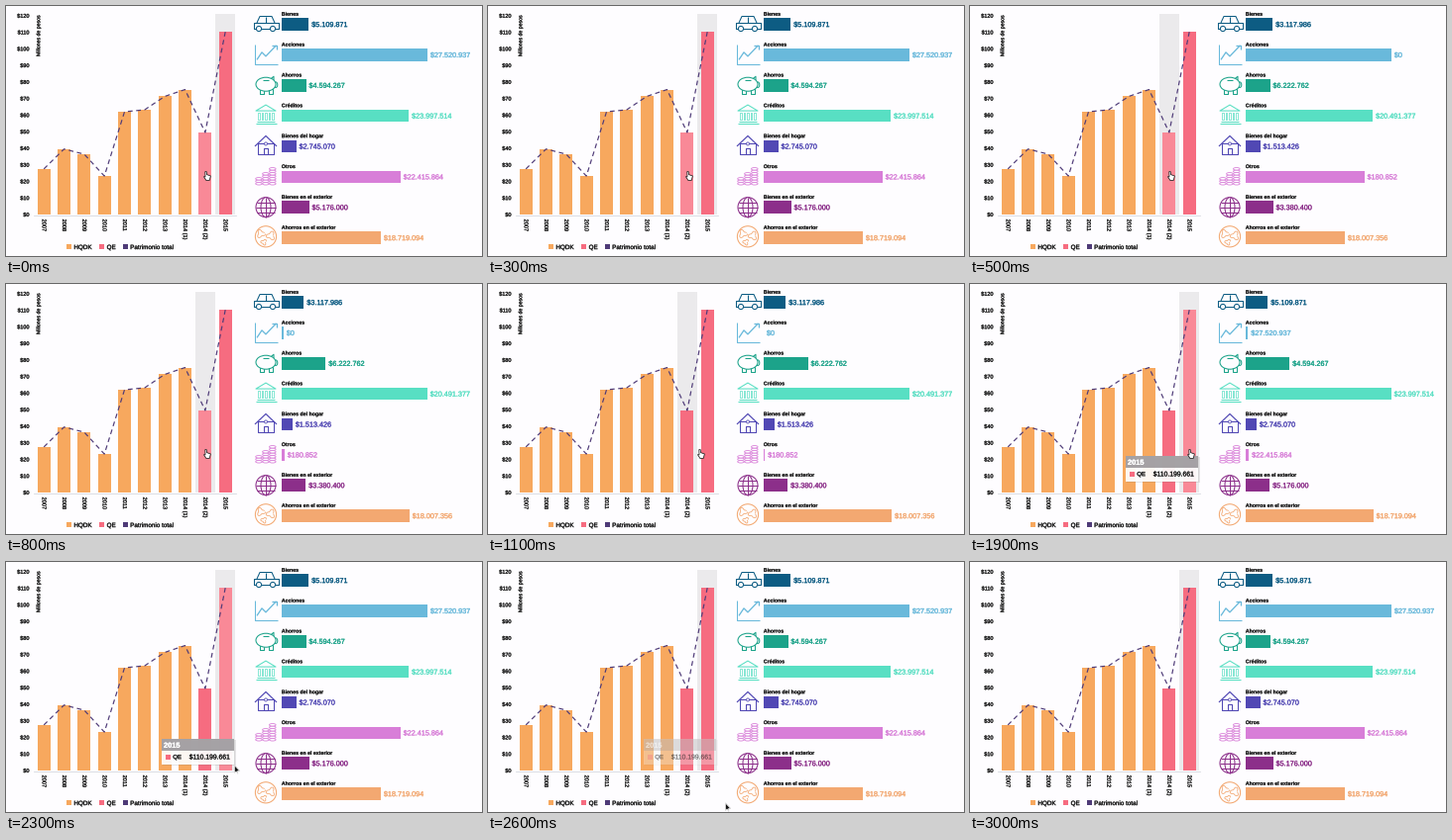
A matplotlib script that plays this animation: 480 by 253 pixels, repeating every 3100 ms.

```python
import numpy as np
import matplotlib.pyplot as plt
from matplotlib.animation import FuncAnimation
from matplotlib.patches import Ellipse, Polygon, Rectangle
from matplotlib.patheffects import withStroke
from matplotlib.transforms import Affine2D

W, H, DPI = 480, 253, 64
FRAMES, INTERVAL = 31, 100
PT = 72 / DPI  # points per pixel
PAPER, INK = "#fefdff", "#1c1c1c"

plt.rcParams["font.family"] = "Liberation Sans"
plt.rcParams["text.hinting"] = "none"

fig = plt.figure(figsize=(W / DPI, H / DPI), dpi=DPI, facecolor=PAPER)
ax = fig.add_axes([0, 0, 1, 1])
ax.set_xlim(0, W)
ax.set_ylim(H, 0)
ax.axis("off")


def raw_text(x, y, s, size, color=INK, weight=0.25, **kw):
    """Text with a thin outline of its own colour to firm up small type."""
    return ax.text(x, y, s, fontsize=size * PT, color=color, path_effects=[
        withStroke(linewidth=weight * PT, foreground=color)], **kw)


def text(x, y, s, size, color=INK, **kw):
    """Text whose capitals are centred on y."""
    return raw_text(x, y + 0.36 * size, s, size, color, va="baseline", **kw)


def rect(x, y, w, h, color, z=1):
    return ax.add_patch(Rectangle((x, y), w, h, fc=color, lw=0, zorder=z))


# ---------- column chart ----------
ORANGE, RED, PALE_RED, PURPLE = "#f7a85e", "#f66c80", "#f98997", "#4f3b78"
BASE, UNIT, STEP = 211, 1.677, 20.33
YEARS = [str(y) for y in range(2007, 2014)] + ["2014 (1)", "2014 (2)", "2015"]
TOTALS = np.array([27.5, 39.5, 36.4, 23.2, 62, 63.2, 71.3, 75.4, 49.5, 110.2])
centers = 38.2 + STEP * np.arange(len(YEARS))
tops = BASE - UNIT * TOTALS

for k in range(0, 130, 10):
    text(23.5, BASE - k * UNIT, f"${k}", 5.5, ha="right")
raw_text(35.3, 51, "Millones de pesos", 5.2, rotation=90, ha="right",
         va="bottom")

band = rect(0, 8, STEP, BASE - 8, "#ebeaec", 0)
columns = []
for k, (x, top, year) in enumerate(zip(centers, tops, YEARS)):
    columns.append(rect(x - 6.5, top, 13, BASE - top, ORANGE if k < 8 else RED))
    raw_text(x, 215.6, year, 5.6, rotation=270, ha="center", va="top")
ax.plot([28, 231.5], [BASE + 0.5] * 2, color="#d3d5de", lw=0.8 * PT, zorder=2)
ax.plot(centers, tops, color=PURPLE, lw=1.2 * PT, ls=(0, (4, 3)), zorder=3)

for x, color, name in [(60.8, ORANGE, "HQDK"), (94, RED, "QE"),
                       (117.6, PURPLE, "Patrimonio total")]:
    rect(x, 241.2, 5.2, 5.2, color)
    text(x + 7.6, 243.8, name, 6.3)


# ---------- icons ----------
class Pen:
    """Draws outlines around a centre in one colour."""

    def __init__(self, x, y, color):
        self.at, self.color = np.array([x, y]), color

    def add(self, patch, width):
        patch.set(edgecolor=self.color, linewidth=width * PT, zorder=3,
                  joinstyle="round")
        ax.add_patch(patch)

    def line(self, *pts, width=1.05, closed=False):
        self.add(Polygon(self.at + pts, closed=closed, fc="none"), width)

    def box(self, x, y, w, h, width=1.05):
        self.add(Rectangle(self.at + (x, y), w, h, fc=PAPER), width)

    def ring(self, x, y, rx, ry, width=1.05, fill=PAPER):
        self.add(Ellipse(self.at + (x, y), 2 * rx, 2 * ry, fc=fill), width)


def car(p):
    p.box(-12.5, -1.5, 25, 6)
    p.line((-9, -1.5), (-6, -8), (6, -8), (9, -1.5))
    p.line((0, -8), (0, -1.5))
    for x in (-7, 7):
        p.ring(x, 4.5, 2.6, 2.6)


def stocks(p):
    p.line((-11, -10), (-11, 9.5), (12, 9.5))
    p.line((-9, 5), (-4, -2.5), (0, 1.5), (10.5, -9.5), width=1.3)
    p.line((6, -9.5), (10.5, -9.5), (10.5, -5), width=1.3)


def pig(p):
    for x in (-6, 3):
        p.box(x, 4, 3.5, 4.5)
    p.ring(10, -0.5, 1.8, 2.8)
    p.ring(0, -1, 10, 7)
    p.line((-3, -5), (3, -5))
    p.line((5, -6.5), (8, -9), (8, -5))


def bank(p):
    p.line((-10, -5), (0, -11), (10, -5), closed=True)
    for x in np.linspace(-7, 7, 5):
        p.box(x - 0.6, -3.5, 1.2, 7.5, width=0.7)
    for y, half in ((5.5, 9), (8, 10.5)):
        p.line((-half, y), (half, y))


def house(p):
    p.box(-8, -3, 16, 11.5)
    p.line((-11, 0), (0, -10.5), (11, 0), width=1.2)
    p.box(-2, 2.5, 4, 6)
    p.ring(0, -2.5, 1.5, 1.5, width=0.8)


def coins(p):
    for stack in range(3):
        for level in range(3 + 2 * stack):
            p.ring(-7 + 6.9 * stack, 7 - 2.5 * level, 3.3, 1.25, width=0.8)


def globe(p, r=10):
    p.ring(0, 0, r, r)
    p.ring(0, 0, r / 2, r)
    p.line((0, -r), (0, r))
    for y in (-r / 2, 0, r / 2):
        half = np.sqrt(r * r - y * y)
        p.line((-half, y), (half, y))


def earth(p):
    p.ring(0, -1.2, 10.6, 10.6)
    a = np.linspace(0, 2 * np.pi, 24)
    for x, y, size in ((-5, -4, 3.4), (5, -2, 3.6), (-2, 4.5, 2.4)):
        r = size * (1 + 0.35 * np.sin(3 * a + x))
        p.line(*np.c_[x + r * np.cos(a), y + r * np.sin(a)], width=0.8)


# ---------- horizontal bars ----------
LEFT, FULL, PITCH = 278, 147, 30.86
ROWS = [  # label, colour, icon, amount in 2015, amount in 2014 (2)
    ("Bienes", "#0d5c83", car, 5109871, 3117986),
    ("Acciones", "#69b9db", stocks, 27520937, 0),
    ("Ahorros", "#1ca38a", pig, 4594267, 6222762),
    ("Créditos", "#58dfc3", bank, 23997514, 20491377),
    ("Bienes del hogar", "#5148b4", house, 2745070, 1513426),
    ("Otros", "#d87ed8", coins, 22415864, 180852),
    ("Bienes en el exterior", "#8c2f8a", globe, 5176000, 3380400),
    ("Ahorros en el exterior", "#f3a871", earth, 18719094, 18007356),
]
amounts = np.array([r[3:] for r in ROWS])
lengths = FULL * amounts / amounts.max(axis=0)
bars, values = [], []
for k, (name, color, icon, *_) in enumerate(ROWS):
    y = 18.5 + PITCH * k
    icon(Pen(262, y, color))
    text(LEFT - 0.2, y - 10.6, name, 5.25, weight=0.1, fontweight="bold")
    bars.append(rect(LEFT, y - 6.3, 1, 12.6, color))
    values.append(text(LEFT, y, "", 7.25, color))

# ---------- tooltip, crosshair and pointer ----------
crosshair, = ax.plot([centers[9]] * 2, [8, BASE], color="#b5aab4",
                     lw=0.8 * PT, zorder=4)

TIP_X, TIP_Y, TIP_W = 156.5, 174, 73
tip_shift = Affine2D()
tooltip = [  # artist, full opacity
    (rect(TIP_X + 1, TIP_Y + 1, TIP_W + 1, 26, "#777777", 5), 0.18),
    (rect(TIP_X, TIP_Y, TIP_W, 25.5, "#ffffff", 6), 0.92),
    (rect(TIP_X, TIP_Y, TIP_W, 12, "#9c989c", 7), 0.9),
    (rect(TIP_X + 4, TIP_Y + 15.5, 5, 5, RED, 8), 1),
    (text(TIP_X + 2.5, TIP_Y + 6.2, "2015", 7.4, "white", fontweight="bold",
          zorder=8), 1),
    (text(TIP_X + 11.8, TIP_Y + 18, "QE", 6, zorder=8), 1),
    (text(TIP_X + 69, TIP_Y + 18, "$110.199.661", 6.8, ha="right",
          zorder=8), 1),
]
for part, _ in tooltip:
    part.set_transform(part.get_transform() + Affine2D() if False else
                       (part.get_patch_transform() * 0 if False else
                        tip_shift + ax.transData))

HAND = np.array([(-2.2, -4.4), (-0.8, -4.4), (-0.5, -1.4), (3.4, 0),
                 (2.2, 4.5), (-1.1, 4.5), (-3.6, 0.6), (-2, 0.8)])
ARROW = np.array([(-1.6, -4.4), (-1.6, 3.2), (0.2, 1.8), (1.8, 4.2),
                  (1.6, 1.3), (3.6, 1.2)])
pointer = ax.add_patch(Polygon(HAND, lw=0.8 * PT, zorder=10))

# ---------- motion, timed in frames ----------
FIRST_CLICK, SECOND_CLICK, GLIDE = 4.8, 18.4, 3.75
ARRIVE, LEAVE = 13, 20


def ease(p):
    p = np.clip(p, 0, 1)
    return 4 * p ** 3 if p < 0.5 else 1 - 4 * (1 - p) ** 3


def update(i):
    earlier = FIRST_CLICK <= i < SECOND_CLICK
    band.set_x(centers[8 if earlier else 9] - STEP / 2)
    columns[8].set_facecolor(PALE_RED if i < 10 else RED)
    columns[9].set_facecolor(PALE_RED if ARRIVE <= i < 25 else RED)
    crosshair.set_visible(ARRIVE <= i < SECOND_CLICK)

    mix = ease((i - FIRST_CLICK) / GLIDE) - ease((i - SECOND_CLICK) / GLIDE)
    for bar, value, ends, pair in zip(bars, values, lengths, amounts):
        length = ends[0] + (ends[1] - ends[0]) * mix
        bar.set_width(length)
        value.set_x(LEFT + length + 2.9)
        value.set_text(f"${pair[int(earlier)]:,}".replace(",", "."))

    away = max(i - LEAVE, 0)
    tip_shift.clear().translate(0, min(2.5 * away, 5))
    alpha = np.clip(min((i - 12) / 2, (27 - i) / 3), 0, 1)
    for part, opacity in tooltip:
        part.set_alpha(alpha * opacity)

    x = 203 + 20 * np.clip((i - 8) / 5, 0, 1) + 3 * away
    y = 172 + 12.7 * away
    arrow = x > 228
    pointer.set_xy((ARROW if arrow else HAND) + (x, y))
    pointer.set_facecolor("#111111" if arrow else "white")
    pointer.set_edgecolor("#dddddd" if arrow else "#222222")
    return []


anim = FuncAnimation(fig, update, frames=FRAMES, interval=INTERVAL,
                     init_func=lambda: update(0), repeat=True, repeat_delay=0)
plt.show()
```
